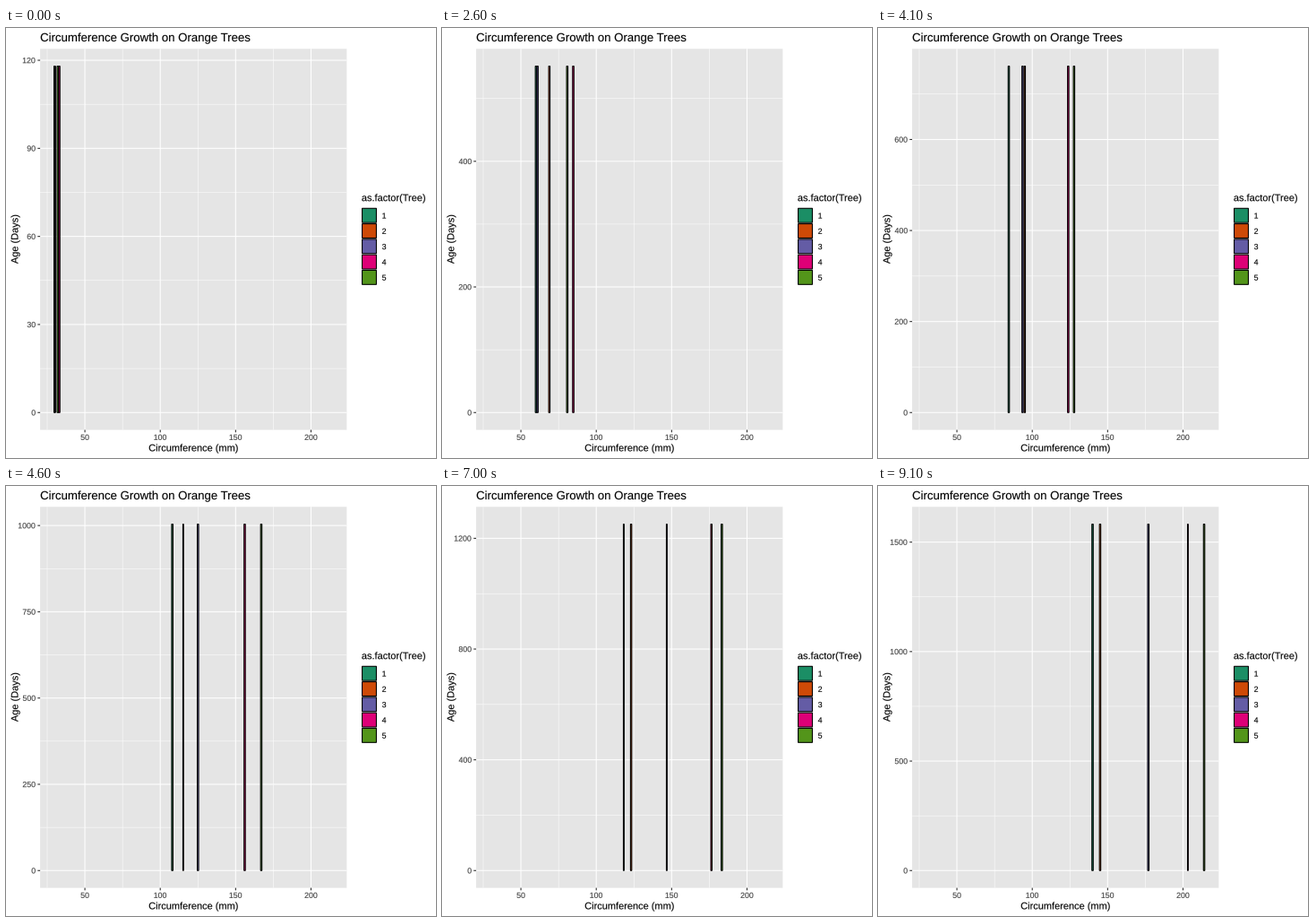
Write a matplotlib script that moves like this. It is 480 by 480 pixels and loops after 10000 ms.

```python
import numpy as np
import matplotlib.pyplot as plt
from matplotlib.animation import FuncAnimation
from matplotlib.patches import PathPatch, Rectangle
from matplotlib.textpath import TextPath
from matplotlib.transforms import Affine2D

SIZE, DPI = 480, 100
PX = 72 / DPI  # one pixel in points
LEFT, RIGHT, TOP, BOTTOM = 38.1, 380.35, 23.25, 448.6
THICK, THIN = 1.07, 0.53
COLORS = ["#1b8e65", "#ce4a07", "#645ca5", "#de0077", "#53951a"]
TICK_TEXT, TICK_LINE, PANEL = "#404040", "#282828", "#e5e5e5"

AGES = np.array([118, 484, 664, 1004, 1231, 1372, 1582])
GIRTHS = np.array([
    [30, 51, 75, 108, 115, 139, 140],
    [30, 58, 87, 115, 120, 142, 145],
    [30, 49, 81, 125, 142, 174, 177],
    [33, 69, 111, 156, 172, 203, 203],
    [32, 62, 112, 167, 179, 209, 214],
])
BAR = 0.9
STARTS = [0, 15, 31, 46, 61, 76, 91]  # tenths of a second
STEPS = [0, 8, 8, 7, 7, 7, 7]
FRAMES = 100


def dodge():
    """Left edge and width of every bar; equal girths share one slot."""
    flat = GIRTHS.ravel()
    lefts, widths = [], []
    for i, girth in enumerate(flat):
        width = BAR / np.sum(flat == girth)
        rank = np.sum(flat[:i] == girth)
        lefts.append(girth - BAR / 2 + rank * width)
        widths.append(width)
    return np.reshape(lefts, GIRTHS.shape), np.reshape(widths, GIRTHS.shape)


BAR_LEFT, BAR_WIDTH = dodge()
X_MIN, X_MAX = GIRTHS.min() - BAR / 2, GIRTHS.max() + BAR / 2
X_PAD = 0.05 * (X_MAX - X_MIN)
X_SCALE = (RIGHT - LEFT) / (X_MAX - X_MIN + 2 * X_PAD)
Y_ZERO = BOTTOM - (BOTTOM - TOP) * 0.05 / 1.1
BAR_HEIGHT = (BOTTOM - TOP) / 1.1


def x_px(value):
    return LEFT + (value - X_MIN + X_PAD) * X_SCALE


def tick_step(low, high, wanted=5):
    """Spacing of ticks from zero: simplicity, coverage and density."""
    best, best_step = -np.inf, 1
    for power in (10, 100, 1000):
        for i, q in enumerate((1, 5, 2, 2.5, 4, 3)):
            step = q * power
            for count in range(2, 11):
                last = step * (count - 1)
                miss = (high - last) ** 2 + low ** 2
                cover = 1 - 0.5 * miss / (0.1 * (high - low)) ** 2
                ratio = (max(last, high) - low) / step / (wanted - 1)
                density = 2 - max(ratio, 1 / ratio)
                score = 0.25 * (1 - i / 5) + 0.2 * cover + 0.5 * density
                if score > best:
                    best, best_step = score, step
    return best_step


fig = plt.figure(figsize=(SIZE / DPI, SIZE / DPI), dpi=DPI, facecolor="white")
ax = fig.add_axes([0, 0, 1, 1])
ax.set_xlim(0, SIZE)
ax.set_ylim(SIZE, 0)
ax.axis("off")


def text(x, y, string, size, color="black", align=0, angle=0, z=5):
    path = TextPath((0, 0), string, size=size, prop={"family": "Liberation Sans"})
    box = path.get_extents()
    place = Affine2D().translate(-align * (box.x0 + box.x1), 0).scale(1, -1)
    place.rotate_deg(angle).translate(x, y)
    return ax.add_patch(PathPatch(place.transform_path(path), fc=color, ec=color,
                                  lw=0.12 * PX, snap=False, zorder=z))


def line(xs, ys, color, width, z):
    return ax.plot(xs, ys, color=color, lw=width * PX, snap=False, zorder=z,
                   solid_capstyle="butt")[0]


def rect(x, y, w, h, color, edge="none", width=0, z=0):
    return ax.add_patch(Rectangle((x, y), w, h, fc=color, ec=edge, lw=width * PX,
                                  joinstyle="miter", snap=False, zorder=z))


def draw_fixed():
    rect(LEFT, TOP, RIGHT - LEFT, BOTTOM - TOP, PANEL)
    for value in range(25, 201, 25):
        x = x_px(value)
        major = value % 50 == 0
        line([x, x], [TOP, BOTTOM], "white", THICK if major else THIN, 2 if major else 1)
        if major:
            line([x, x], [BOTTOM, BOTTOM + 2.75], TICK_LINE, THICK, 2)
            text(x, 459.9, str(value), 8.8, TICK_TEXT, align=0.5)

    text(LEFT, 14.95, "Circumference Growth on Orange Trees", 13.2)
    text((LEFT + RIGHT) / 2, 472.4, "Circumference (mm)", 11, align=0.5)
    text(13.4, (TOP + BOTTOM) / 2, "Age (Days)", 11, align=0.5, angle=-90)

    key, x = 17.28, 396.85
    text(x, 193.2, "as.factor(Tree)", 11)
    for i, color in enumerate(COLORS):
        y = 200.6 + i * key
        rect(x, y, key, key, "#efefef")
        rect(x + 0.71, y + 0.71, key - 1.42, key - 1.42, color, "black", THICK, 1)
        text(x + key + 5.5, y + key / 2 + 3.3, str(i + 1), 8.8)


def state(frame):
    """Age, left edges and widths of the bars at one moment."""
    i = max(k for k, start in enumerate(STARTS) if frame > start - STEPS[k] or k == 0)
    if i == 0:
        return AGES[0], BAR_LEFT[:, 0], BAR_WIDTH[:, 0]
    t = min(1, 1 - (STARTS[i] - frame) / STEPS[i])

    def mix(values):
        return values[..., i - 1] * (1 - t) + values[..., i] * t

    return mix(AGES), mix(BAR_LEFT), mix(BAR_WIDTH)


moving = []


def update(frame):
    while moving:
        moving.pop().remove()
    age, lefts, widths = state(frame)
    low, high = -0.05 * age, 1.05 * age
    half = tick_step(low, high) / 2
    for n in range(int(high // half) + 1):
        value = n * half
        y = Y_ZERO - BAR_HEIGHT * value / age
        if n % 2:
            moving.append(line([LEFT, RIGHT], [y, y], "white", THIN, 1))
        else:
            moving.append(line([LEFT, RIGHT], [y, y], "white", THICK, 2))
            moving.append(line([LEFT - 2.75, LEFT], [y, y], TICK_LINE, THICK, 2))
            moving.append(text(LEFT - 4.95, y + 3.15, f"{value:.0f}", 8.8,
                               TICK_TEXT, align=1))
    for left, width, color in zip(lefts, widths, COLORS):
        moving.append(rect(x_px(left), Y_ZERO - BAR_HEIGHT, width * X_SCALE,
                           BAR_HEIGHT, color, "black", THICK, 4))
    return moving


draw_fixed()
anim = FuncAnimation(fig, update, frames=FRAMES, interval=100, repeat=True,
                     repeat_delay=0, blit=False)
plt.show()
```
